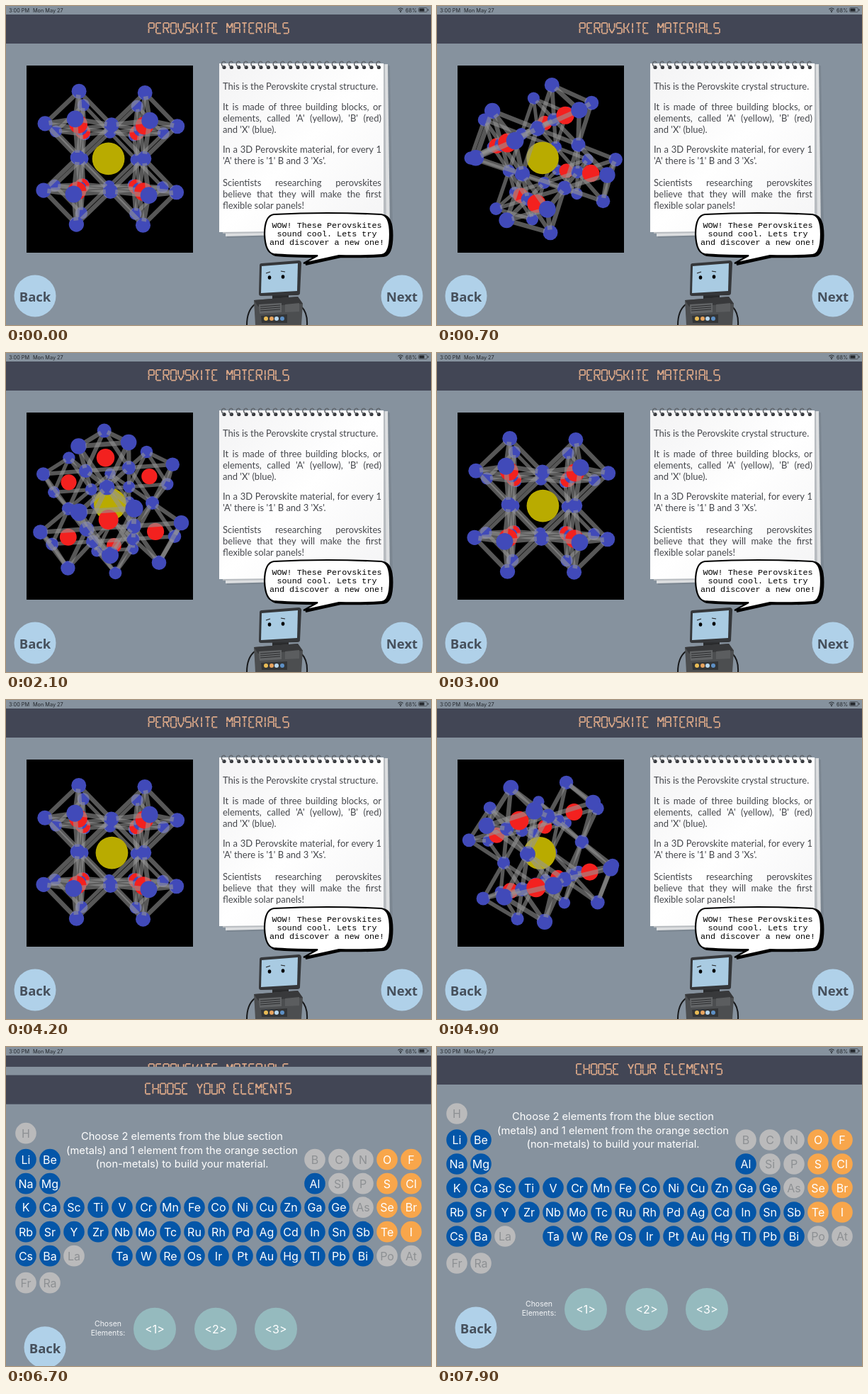
These frames come from a looping animation (600 by 450 pixels, 8000 ms). An HTML page with a canvas:

```html
<!DOCTYPE html>
<html lang="en">
<head>
<meta charset="utf-8">
<title>Perovskite materials</title>
<style>
html, body { margin: 0; width: 100%; height: 100%; overflow: hidden; background: #86929e; }
#stage { position: relative; width: 600px; height: 450px; overflow: hidden; }
#stage > * { position: absolute; left: 0; top: 0; }
#stage #crystal { left: 29px; top: 84px; }
#note { font: 13px Lato, sans-serif; color: #45474c; }
#note div { position: absolute; left: 306px; line-height: 16px; white-space: nowrap; }
#note .full { width: 224px; text-align-last: justify; }
svg { font-family: Inter, "Liberation Sans", sans-serif; }
.mid { text-anchor: middle; }
.btn { font: bold 18.5px "Open Sans", sans-serif; fill: #46505c; text-anchor: middle; }
.mono { font: 11.75px "Liberation Mono", monospace; text-anchor: middle; }
.seg { fill: none; stroke: #dba888; stroke-width: 1.8; }
</style>
</head>
<body>
<div id="stage">
  <svg id="page1" width="600" height="450">
    <defs>
      <linearGradient id="paper" x1="0" y1="0" x2="1" y2="1">
        <stop offset="0" stop-color="#f3f3f4"/><stop offset=".5" stop-color="#fff"/><stop offset="1" stop-color="#f4f4f5"/>
      </linearGradient>
    </defs>
    <rect width="600" height="450" fill="#86929e"/>
    <rect y="12" width="600" height="41" fill="#424655"/>
    <path d="M312 90L542 84L546 322L312 327Z" fill="#7b8691"/>
    <path d="M310 90L539 82L542 319L310 325Z" fill="#dcdee0"/>
    <path d="M306 86L535 82L537 318L306 321Z" fill="#b8bcc0"/>
    <path d="M301 81H533V316L301 319Z" fill="url(#paper)"/>
    <g id="rings"></g>
    <g id="robot">
      <path d="M351 421Q340 430 340 450M417 424Q426 433 425 450" fill="none" stroke="#17181a" stroke-width="2"/>
      <path d="M376 408H399V417H376Z" fill="#2a2b2d"/>
      <path d="M350 415L412 410L419 420L417 450H352Z" fill="#4c4e50"/>
      <path d="M350 415L412 410L419 420L356 424Z" fill="#38393b"/>
      <path d="M357 421L389 419V432L358 434Z" fill="#626466"/>
      <path d="M359 424L387 422M359 427L387 425M359 430L387 428" stroke="#2b2c2e"/>
      <path d="M394 421L414 419V431L394 432Z" fill="#5b5d5f"/>
      <path d="M360 437L397 435V447H361Z" fill="#333537"/>
      <circle cx="367" cy="441" r="3" fill="#e8bb55"/><circle cx="375" cy="441" r="3" fill="#e9a45e"/>
      <circle cx="382" cy="441" r="3" fill="#b7d6ec"/><circle cx="390" cy="441" r="3" fill="#5d8fc4"/>
      <path d="M358 366Q358 363 361 363L413 359Q417 359 417 363L415 405Q415 408 411 408L360 409Q357 409 357 406Z" fill="#35373a"/>
      <path d="M361 367L412 363L411 402L360 405Z" fill="#a9cbe2"/>
      <ellipse cx="372" cy="383" rx="2.3" ry="2.8"/><ellipse cx="391" cy="382" rx="2.3" ry="2.8"/>
      <path d="M367 377L373 375M388 374L394 375" fill="none" stroke="#222" stroke-width="1.1"/>
    </g>
    <path id="shade" transform="translate(3 1.5)" stroke="#000" stroke-width="3"/>
    <path id="bubble" fill="#fff" stroke="#000" stroke-width="2.2" d="M378 294Q453 290 530 294Q542 296 542 322Q542 350 530 351Q500 353 470 352L420 363L440 352Q400 352 378 350Q366 348 365 322Q365 296 378 294Z"/>
    <g class="mono"><text x="453" y="313">WOW! These Perovskites</text><text x="453" y="325">sound cool. Lets try</text><text x="453" y="337">and discover a new one!</text></g>
    <circle cx="41" cy="409" r="29.5" fill="#b0d1e9"/><text class="btn" x="41" y="417">Back</text>
    <circle cx="559" cy="409" r="29.5" fill="#b0d1e9"/><text class="btn" x="559" y="417">Next</text>
  </svg>
  <canvas id="crystal" width="235" height="264"></canvas>
  <div id="note"></div>
  <svg id="page2" width="600" height="450">
    <rect width="600" height="450" fill="#86929e"/>
    <rect y="12" width="600" height="41" fill="#424655"/>
    <g class="mid" font-size="14.7" fill="#fff">
      <text x="248.5" y="103">Choose 2 elements from the blue section</text>
      <text x="248.5" y="123">(metals) and 1 element from the orange section</text>
      <text x="248.5" y="142">(non-metals) to build your material.</text>
    </g>
    <g class="mid" font-size="10.5" fill="#f2f4f6"><text x="144" y="366">Chosen</text><text x="144" y="379">Elements:</text></g>
    <circle cx="55" cy="396" r="29.5" fill="#b0d1e9"/><text class="btn" x="55" y="404">Back</text>
  </svg>
  <svg width="600" height="12" fill="#23272c">
    <g font-size="7.3"><text x="4" y="8.5">3:00 PM</text><text x="38" y="8.5">Mon May 27</text><text x="564" y="8.5">68%</text></g>
    <path d="M553.5 4.5Q557 1.5 560.5 4.5M555 6.3Q557 4.6 559 6.3" fill="none" stroke="#23272c" stroke-width="1.1"/>
    <circle cx="557" cy="8" r="1"/>
    <rect x="582.5" y="2.5" width="12" height="6" rx="1.5" fill="none" stroke="#4a4f55" stroke-width=".8"/>
    <rect x="583.5" y="3.5" width="7" height="4" rx=".6"/><rect x="595.5" y="4.3" width="1" height="2.4"/>
  </svg>
</div>
<script>
const $ = id => document.getElementById(id);

function add(parent, tag, attrs, text = '') {
  const el = document.createElementNS('http://www.w3.org/2000/svg', tag);
  for (const k in attrs) el.setAttribute(k, attrs[k]);
  el.textContent = text;
  parent.append(el);
}

// Segment lettering: strokes between the nodes of a 3 by 3 grid, numbered 0 to 8.
const glyphs = {
  P: '630253', E: '20368 34', R: '630253 48', O: '0258630', V: '037 257', S: '203586',
  K: '036 342 48', I: '147', T: '02 147', M: '6304258', A: '630258 35', L: '0368',
  C: '20368', H: '036 258 35', Y: '042 47', U: '036852', N: '6304852'
};
function segments(page, text, x) {
  let d = '';
  for (const ch of text) {
    const narrow = ch === 'I', dx = narrow ? x - 2 : x;
    for (const run of (glyphs[ch] || '').split(' '))
      for (let i = 1; i < run.length; i++) {
        const [ax, ay, bx, by] = [run[i - 1], run[i]].flatMap(n => [dx + n % 3 * 3.8, 23.8 + (n / 3 | 0) * 7.4]);
        const g = 0.5 / Math.hypot(bx - ax, by - ay), mix = (a, b) => (a + (b - a) * g).toFixed(1);
        d += `M${mix(ax, bx)} ${mix(ay, by)}L${mix(bx, ax)} ${mix(by, ay)}`;
      }
    x += narrow ? 6.5 : 10.4;
  }
  add(page, 'path', { d, class: 'seg' });
}
segments($('page1'), 'PEROVSKITE MATERIALS', 201.5);
segments($('page2'), 'CHOOSE YOUR ELEMENTS', 197);

$('shade').setAttribute('d', $('bubble').getAttribute('d'));
for (let i = 0; i < 22; i++) {
  const x = 307 + i * 10.4;
  add($('rings'), 'circle', { cx: x + 1, cy: 86.5, r: 2.6, fill: '#36383c' });
  add($('rings'), 'path', { d: `M${x + 1} 86Q${x - 4} 84 ${x - 2} 79.5Q${x + 1} 76.5 ${x + 3} 80`, fill: 'none', stroke: '#5d6166', 'stroke-width': 1.4 });
}

// A leading + marks a line set to the full width.
const lines = {
  113: 'This is the Perovskite crystal structure.',
  142: '+It is made of three building blocks, or', 158: "+elements, called 'A' (yellow), 'B' (red)", 174: "and 'X' (blue).",
  202: '+In a 3D Perovskite material, for every 1', 218: "'A' there is '1' B and 3 'Xs'.",
  249: '+Scientists researching perovskites', 265: '+believe that they will make the first', 281: 'flexible solar panels!'
};
for (const y in lines) {
  const div = document.createElement('div');
  div.textContent = lines[y].replace('+', '');
  div.className = lines[y][0] === '+' ? 'full' : '';
  div.style.top = y - 8 + 'px';
  $('note').append(div);
}

// Periodic table: a number stands for that many empty places.
const rows = {
  94: 'H', 131: 'Li Be 10 B C N O F', 165: 'Na Mg 10 Al Si P S Cl',
  198.5: 'K Ca Sc Ti V Cr Mn Fe Co Ni Cu Zn Ga Ge As Se Br',
  233: 'Rb Sr Y Zr Nb Mo Tc Ru Rh Pd Ag Cd In Sn Sb Te I',
  267: 'Cs Ba La 1 Ta W Re Os Ir Pt Au Hg Tl Pb Bi Po At', 305: 'Fr Ra'
};
const grey = 'H B C N Si P As La Po At Fr Ra'.split(' '), orange = 'O F S Cl Se Br Te I'.split(' ');
function disc(x, y, r, fill, label, ink) {
  add($('page2'), 'circle', { cx: x, cy: y, r, fill });
  add($('page2'), 'text', { x, y: +y + 6, class: 'mid', 'font-size': 16, fill: ink }, label);
}
for (const y in rows) {
  let col = 0;
  for (const name of rows[y].split(' ')) {
    if (+name) { col += +name; continue; }
    const dull = grey.includes(name);
    disc(28 + 34 * col++, y, 14.8, dull ? '#bababb' : orange.includes(name) ? '#f8a64b' : '#0456a8', name, dull ? '#8d9093' : '#fff');
  }
}
[210, 296, 381].forEach((x, i) => disc(x, 370, 30, '#95babe', `<${i + 1}>`, '#fff'));

// Crystal: eight octahedra around one large atom, in units of half a cell.
const atoms = [{ p: [-0.058, 0, 0], r: 0.545, fill: '#b9ab00' }], bonds = [];
const seen = new Set(), signs = [-1, 1];
for (const x of signs) for (const y of signs) for (const z of signs) {
  const b = [x, y, z], tips = [];
  atoms.push({ p: b, r: 0.275, fill: '#f3211f' });
  for (let axis = 0; axis < 3; axis++) for (const s of signs) {
    const p = b.map((v, i) => i === axis ? v + s : v);
    tips.push({ p, axis });
    if (!seen.has(p.join())) atoms.push({ p, r: 0.225, fill: '#414ab9' });
    seen.add(p.join());
  }
  for (const a of tips) for (const c of tips) if (a.axis < c.axis) {
    const mix = f => a.p.map((v, i) => v + (c.p[i] - v) * f);
    bonds.push({ from: mix(0.14), to: mix(0.86) });
  }
}

// One turn of the crystal: orientation quaternions at fractions of the turn.
const TURN = 1200;
const keys = [
  [0, [1, .01, .01, .01]], [1 / 6, [.853, .092, .46, -.228]], [1 / 2, [0, -.014, .714, -.7]],
  [5 / 6, [-.854, .204, .227, -.424]], [1, [-1, -.01, -.01, -.01]]
];
const unit = q => q.map(v => v / Math.hypot(...q));
for (const k of keys) k[1] = unit(k[1]);
function orientation(t) {
  const f = t / TURN % 1, i = keys.findIndex(k => k[0] > f);
  const [t0, a] = keys[i - 1], [t1, b] = keys[i], u = (f - t0) / (t1 - t0);
  const w = Math.acos(a.reduce((s, v, j) => s + v * b[j], 0));
  return unit(a.map((v, j) => v * Math.sin((1 - u) * w) + b[j] * Math.sin(u * w)));
}
function rotate([w, x, y, z], [a, b, c]) {
  const i = 2 * (y * c - z * b), j = 2 * (z * a - x * c), k = 2 * (x * b - y * a);
  return [a + w * i + y * k - z * j, b + w * j + z * i - x * k, c + w * k + x * j - y * i];
}

const ctx = $('crystal').getContext('2d');
function drawCrystal(t) {
  const q = orientation(t);
  const project = p => {
    const [x, y, z] = rotate(q, p), s = 406 / (9.67 - z);
    return { x: 118 + x * s, y: 131.5 + y * s, z, s };
  };
  const parts = atoms.map(a => ({ ...project(a.p), r: a.r, fill: a.fill }));
  for (const b of bonds) {
    const from = project(b.from), to = project(b.to);
    parts.push({ from, to, z: (from.z + to.z) / 2, s: (from.s + to.s) / 2 });
  }
  parts.sort((a, b) => a.z - b.z);
  ctx.fillStyle = '#000';
  ctx.fillRect(0, 0, 235, 264);
  ctx.strokeStyle = 'rgba(150,150,150,.58)';
  for (const p of parts) {
    ctx.beginPath();
    if (p.r) {
      ctx.arc(p.x, p.y, p.r * p.s, 0, 7);
      ctx.fillStyle = p.fill;
      ctx.fill();
    } else {
      ctx.moveTo(p.from.x, p.from.y);
      ctx.lineTo(p.to.x, p.to.y);
      ctx.lineWidth = 0.135 * p.s;
      ctx.stroke();
    }
  }
}

const LOOP = 8000, SLIDE = 6450;
function frame() {
  const t = performance.now() % LOOP;
  drawCrystal(t);
  const y = t < SLIDE ? 450 : 450 * Math.exp((SLIDE - t) / 90);
  $('page2').style.transform = `translateY(${y < 0.5 ? 0 : y}px)`;
  requestAnimationFrame(frame);
}
frame();
</script>
</body>
</html>
```
